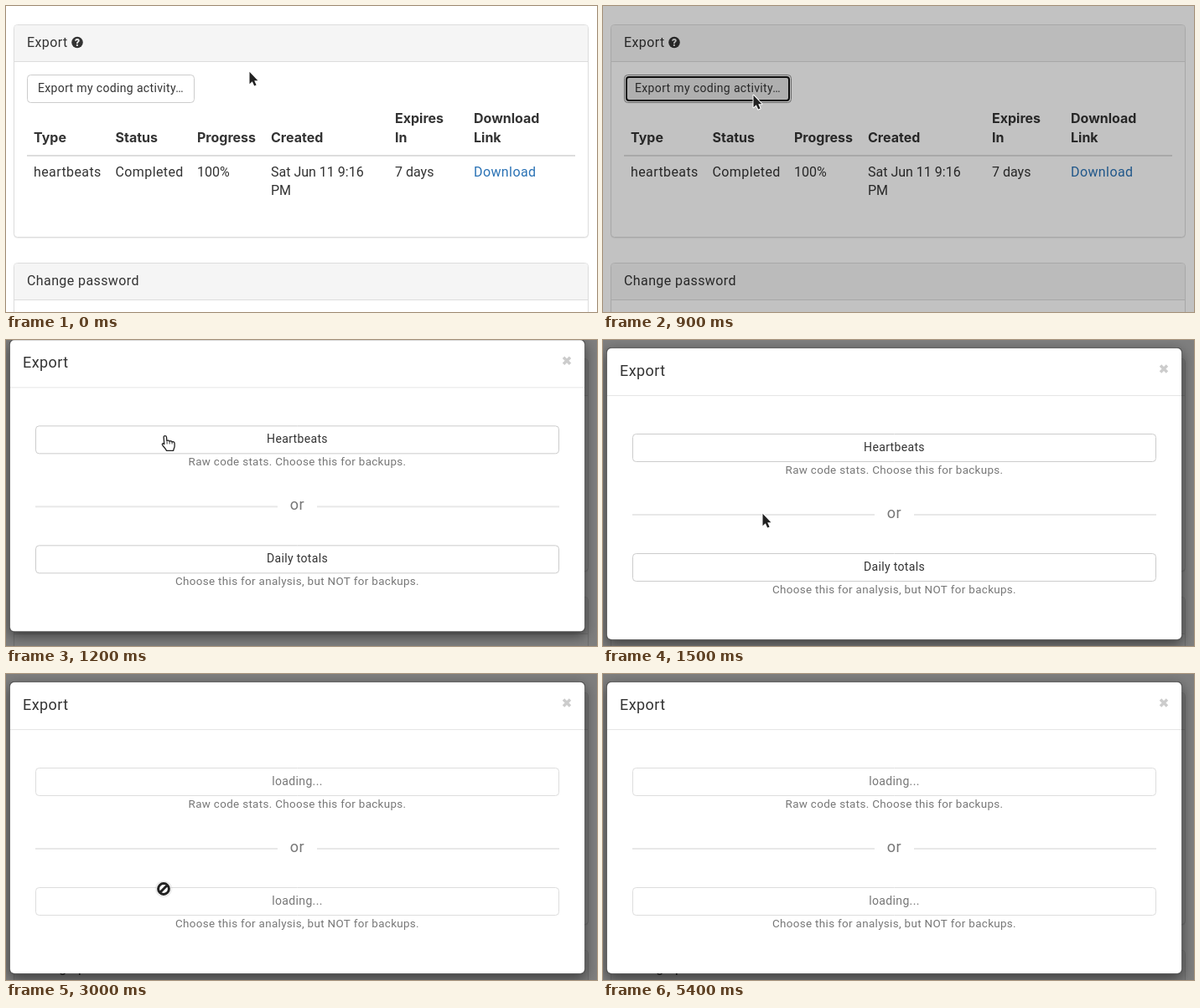
Recreate the animation shown at these times as an HTML page with a canvas. Size 705 by 366 pixels, loop 6.6 s.

```html
<!DOCTYPE html>
<html lang="en">
<head>
<meta charset="utf-8">
<title>Export dialog</title>
<style>
  html, body { margin: 0; width: 100%; height: 100%; overflow: hidden; background: #fff; }
  canvas { display: block; width: 705px; height: 366px; }
</style>
</head>
<body>
<canvas id="stage"></canvas>
<script>
const W = 705, H = 366, LOOP = 6600, STEP = 100;
const SANS = 'Roboto, "Open Sans", sans-serif';
const HEAD = 'Inter, Roboto, sans-serif';
const INK = '#333', MUTED = '#777';
const dpr = window.devicePixelRatio || 1;

function prepare(canvas) {
  canvas.width = W * dpr;
  canvas.height = H * dpr;
  const c = canvas.getContext('2d');
  c.scale(dpr, dpr);
  return c;
}

const stage = prepare(document.getElementById('stage'));
const layerCanvas = document.createElement('canvas');
const layer = prepare(layerCanvas);

// Pointer stops: time, x, y
const STOPS = [
  [0, 290, 78], [600, 179, 106], [1000, 179, 106], [1200, 190, 115],
  [1400, 190, 197], [1800, 188, 264], [2100, 188, 264], [2200, 191, 268],
  [2900, 191, 268], [3600, 145, 77], [3800, 145, 77], [4100, 146, 62],
  [4500, 146, 62], [5200, 82, -3], [5400, 70, -22], [LOOP, 70, -22]
];

const clamp = v => Math.max(0, Math.min(1, v));
const smooth = v => v * v * (3 - 2 * v);

// cubic-bezier(0, 0, .58, 1)
function easeOut(p) {
  let lo = 0, hi = 1;
  for (let i = 0; i < 24; i++) {
    const u = (lo + hi) / 2;
    const x = 3 * (1 - u) * u * u * 0.58 + u * u * u;
    if (x < p) lo = u; else hi = u;
  }
  return smooth(lo);
}

function pointerAt(t) {
  let i = 0;
  while (i < STOPS.length - 2 && t >= STOPS[i + 1][0]) i++;
  const [t0, x0, y0] = STOPS[i], [t1, x1, y1] = STOPS[i + 1];
  const k = smooth(clamp((t - t0) / (t1 - t0)));
  return { x: x0 + (x1 - x0) * k, y: y0 + (y1 - y0) * k };
}

function text(c, str, x, y, { size = 16, color = INK, gap = 0.025, align = 'left', font = SANS, weight = 400 } = {}) {
  c.font = `${weight} ${size}px ${font}`;
  c.letterSpacing = `${(gap * size).toFixed(2)}px`;
  c.textAlign = align;
  c.fillStyle = color;
  c.fillText(str, x, y);
}

function box(c, x, y, w, h, r, fill, line, width = 1) {
  const inset = line ? width / 2 : 0;
  c.beginPath();
  c.roundRect(x + inset, y + inset, w - 2 * inset, h - 2 * inset, r);
  if (fill) { c.fillStyle = fill; c.fill(); }
  if (line) { c.strokeStyle = line; c.lineWidth = width; c.stroke(); }
}

function rect(c, x, y, w, h, fill) {
  c.fillStyle = fill;
  c.fillRect(x, y, w, h);
}

function button(c, x, y, w, label, { fill = '#fff', focus = false, faded = false } = {}) {
  if (focus) {
    box(c, x, y, w, 34, 4, '#fff', '#8c8c8c');
    box(c, x + 2, y + 2, w - 4, 30, 3, fill, '#101010', 2);
  } else {
    box(c, x, y, w, 34, 4, fill, faded ? '#ddd' : '#ccc');
  }
  text(c, label, x + w / 2, y + 21, { size: 14, align: 'center', color: faded ? MUTED : INK });
}

function panel(c, y, h, title) {
  c.save();
  c.shadowColor = 'rgba(0,0,0,.05)';
  c.shadowOffsetY = dpr;
  c.shadowBlur = dpr;
  box(c, 9, y, 686, h, 4, '#fff', '#ddd');
  c.restore();
  box(c, 10, y + 1, 684, 43, [3, 3, 0, 0], '#f5f5f5');
  rect(c, 10, y + 44, 684, 1, '#ddd');
  text(c, title, 25, y + 27);
}

function drawPage(c, t) {
  const grow = t >= 2400 ? 23 : 0;
  rect(c, 0, 0, W, H, '#fff');

  panel(c, 22, 255 + grow, 'Export');
  c.beginPath();
  c.arc(85, 43.5, 6.8, 0, 7);
  c.fillStyle = INK;
  c.fill();
  text(c, '?', 85, 47.8, { size: 12, weight: 900, color: '#f5f5f5', align: 'center', gap: 0 });

  const pressed = t >= 800 && t < 900;
  const hover = t >= 800 || pointerAt(t).x < 225;
  button(c, 25, 82, 200, 'Export my coding activity…', {
    fill: pressed ? '#d4d4d4' : hover ? '#e6e6e6' : '#fff',
    focus: t >= 800
  });

  const head = (str, x, y) => text(c, str, x, y, { font: HEAD, weight: 700, gap: 0 });
  head('Type', 33, 163);
  head('Status', 130.5, 163);
  head('Progress', 228, 163);
  head('Created', 316, 163);
  head('Expires', 464, 140);
  head('In', 464, 163);
  head('Download', 558, 140);
  head('Link', 558, 163);
  rect(c, 25, 178, 654, 2, '#ddd');

  const tight = { gap: 0 };
  text(c, 'heartbeats', 33, 204);
  text(c, 'Completed', 130.5, 204);
  text(c, '100%', 228, 204, tight);
  text(c, 'Sat Jun 11 9:16', 316, 204, tight);
  text(c, 'PM', 316, 226, tight);
  text(c, '7 days', 464, 204, tight);
  text(c, 'Download', 558, 204, { color: '#2a72b5' });

  panel(c, 307 + grow, 120, 'Change password');
}

// Outer shadow stays outside the border, which is see-through
function drawDialogFrame(c) {
  c.save();
  c.shadowColor = 'rgba(0,0,0,.5)';
  c.shadowOffsetY = 5 * dpr;
  c.shadowBlur = 15 * dpr;
  box(c, 4, 9, 687, 350, 6, '#000');
  c.shadowColor = 'transparent';
  c.globalCompositeOperation = 'destination-out';
  box(c, 4, 9, 687, 350, 6, '#000');
  c.restore();
  box(c, 4, 9, 687, 350, 6, 'rgba(0,0,0,.2)');
  box(c, 5, 10, 685, 348, 5, '#fff');
}

function drawModal(c, t, dy) {
  c.clearRect(0, 0, W, H);
  c.save();
  c.translate(0, dy);
  drawDialogFrame(c);

  text(c, 'Export', 20, 43, { size: 18 });
  c.beginPath();
  c.moveTo(665, 30.5);
  c.lineTo(673, 38.5);
  c.moveTo(673, 30.5);
  c.lineTo(665, 38.5);
  c.strokeStyle = '#ccc';
  c.lineWidth = 3.5;
  c.stroke();
  rect(c, 5, 66, 685, 1, '#e5e5e5');

  const busy = t >= 2200;
  const note = { size: 13.4, color: MUTED, align: 'center' };
  button(c, 35, 112, 625, busy ? 'loading...' : 'Heartbeats', { faded: busy });
  text(c, 'Raw code stats. Choose this for backups.', 347.5, 160, note);

  rect(c, 35, 208, 289, 2, '#e8e8e8');
  rect(c, 371, 208, 289, 2, '#e8e8e8');
  text(c, 'or', 347.5, 213, { size: 18, color: MUTED, align: 'center' });

  const held = t >= 2000 && t < 2100;
  const hover = !busy && pointerAt(t).y >= 255;
  button(c, 35, 255, 625, busy ? 'loading...' : 'Daily totals', {
    fill: held ? '#d4d4d4' : hover ? '#e6e6e6' : '#fff',
    focus: t >= 2000 && !busy,
    faded: busy
  });
  text(c, 'Choose this for analysis, but NOT for backups.', 347.5, 303, note);
  c.restore();
}

const ARROW = new Path2D('M.5 .8 V15.2 L3.8 12.2 L6.2 17.6 L8.6 16.5 L6.2 11.3 H10.4 Z');
const HAND = new Path2D('M-1.9 1.2 C-1.9 -.8 1.3 -.8 1.5 1.2 L1.9 5.6 C3 4.8 4.6 5 5 6.2 ' +
  'C6.2 5.4 7.8 5.8 8 7 C9.4 6.3 11 7 11.1 8.6 V12 C11.1 14 9.9 14.8 9.7 17.3 H1.4 ' +
  'C.6 14.6 -2.6 12.8 -3.6 10.2 C-4 8.6 -2.3 8.2 -1.2 9.6 Z');

function drawArrow(c) {
  c.lineJoin = 'round';
  c.lineWidth = 2;
  c.strokeStyle = '#fff';
  c.stroke(ARROW);
  c.fillStyle = '#222';
  c.fill(ARROW);
}

function drawHand(c) {
  c.lineJoin = 'round';
  c.fillStyle = '#fff';
  c.fill(HAND);
  c.strokeStyle = '#222';
  c.lineWidth = 1.3;
  c.stroke(HAND);
  c.beginPath();
  for (const x of [2.1, 5.1, 8.1]) {
    c.moveTo(x, 6.5);
    c.lineTo(x, 9.5);
  }
  c.lineWidth = 0.9;
  c.stroke();
}

function drawBlocked(c) {
  c.shadowColor = 'rgba(0,0,0,.35)';
  c.shadowBlur = 2 * dpr;
  c.beginPath();
  c.arc(0, 0, 8.8, 0, 7);
  c.fillStyle = '#fff';
  c.fill();
  c.shadowColor = 'transparent';
  c.beginPath();
  c.arc(0, 0, 6.4, 0, 7);
  c.moveTo(-4.2, 4.2);
  c.lineTo(4.2, -4.2);
  c.strokeStyle = '#222';
  c.lineWidth = 3;
  c.stroke();
}

function drawPointer(c, t) {
  const { x, y } = pointerAt(t);
  const over = t >= 1200 && ((y >= 112 && y < 146) || (y >= 255 && y < 289));
  c.save();
  c.translate(Math.round(x), Math.round(y));
  if (!over) drawArrow(c);
  else if (t >= 2200) drawBlocked(c);
  else drawHand(c);
  c.restore();
}

function render(t) {
  drawPage(stage, t);

  const dim = 0.5 * clamp((t - 828) / 150);
  if (dim > 0) rect(stage, 0, 0, W, H, `rgba(0,0,0,${dim})`);

  const since = t - 975;
  if (since > 0) {
    drawModal(layer, t, -87.5 * (1 - easeOut(clamp(since / 310))));
    stage.globalAlpha = clamp(since / 160);
    stage.drawImage(layerCanvas, 0, 0, W, H);
    stage.globalAlpha = 1;
  }
  drawPointer(stage, t);
}

const start = performance.now();
function tick() {
  const t = (performance.now() - start) % LOOP;
  render(Math.floor(t / STEP) * STEP);
  requestAnimationFrame(tick);
}
tick();
</script>
</body>
</html>
```
